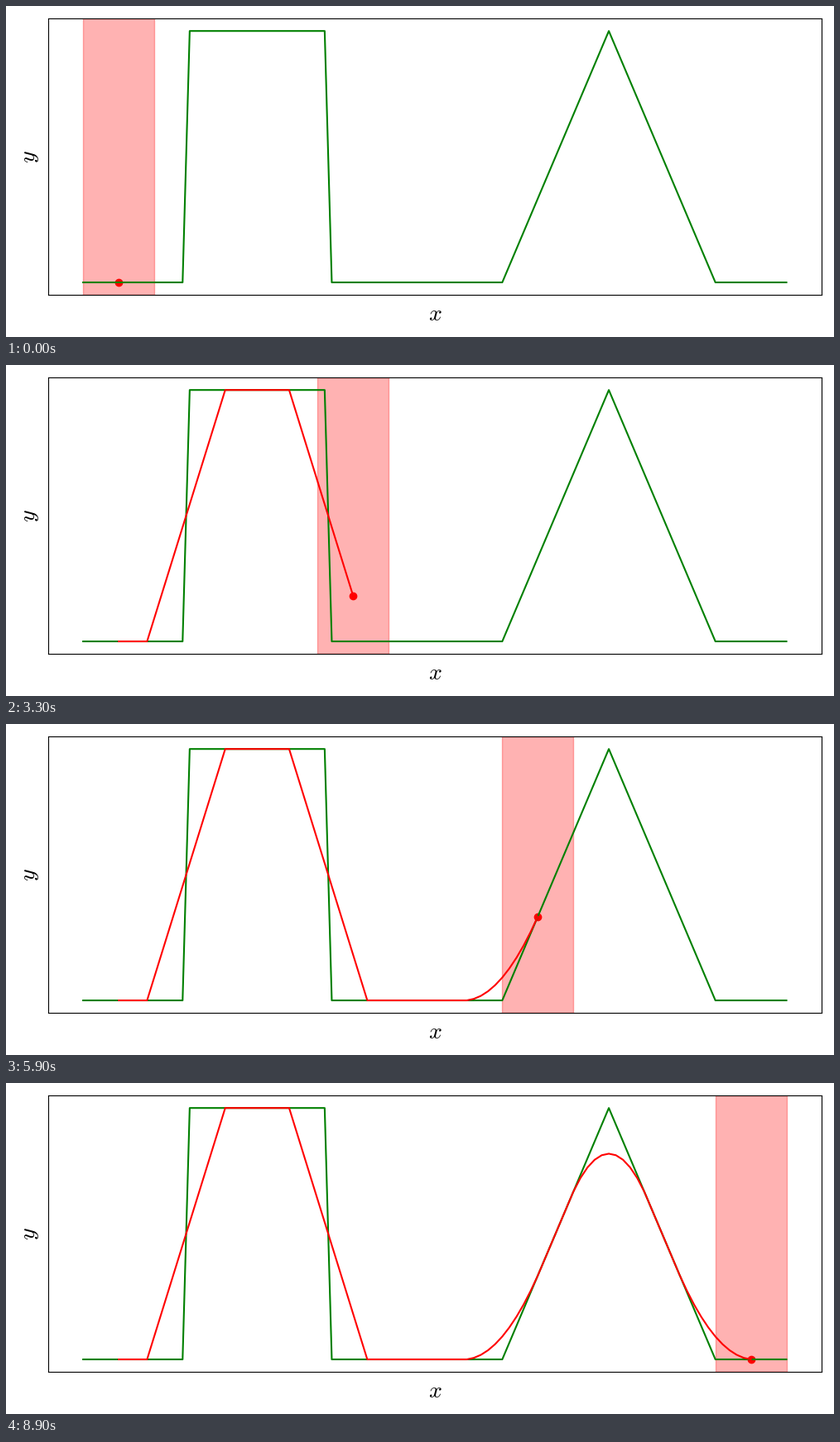
These frames come from a looping animation (1000x400 px, 9 s). A matplotlib script:

```python
import numpy as np
import matplotlib.pyplot as plt
from matplotlib.animation import FuncAnimation

plt.rcParams["mathtext.fontset"] = "cm"

W, H, DPI = 1000, 400, 100
COUNT = 100
SPAN = 10  # window width in samples
FRAMES = COUNT - SPAN
LEFT, RIGHT, TOP, BOTTOM = 50.7, 985, 15, 349.2

# A box pulse followed by a triangle pulse
x = np.arange(COUNT)
box = ((x >= 15) & (x < 35)).astype(float)
signal = box + np.clip(1 - np.abs(x - 74) / 15, 0, None)

kernel = np.ones(SPAN + 1) / (SPAN + 1)
smooth = np.convolve(signal, kernel, mode="valid")
centers = np.arange(FRAMES) + SPAN / 2

fig = plt.figure(figsize=(W / DPI, H / DPI), dpi=DPI, facecolor="white")
ax = fig.add_axes([LEFT / W, 1 - BOTTOM / H, (RIGHT - LEFT) / W, (BOTTOM - TOP) / H])
ax.set_xticks([])
ax.set_yticks([])
margin = 0.05
ax.set_xlim(-margin * (COUNT - 1), (1 + margin) * (COUNT - 1))
ax.set_ylim(-margin, 1 + margin)

window = ax.axvspan(0, SPAN, color="red", alpha=0.3)
dot = ax.scatter([centers[0]], [smooth[0]], color="red")
ax.plot(x, signal, color="green")
trail, = ax.plot([], [], color="red")


def label(px, py, text, angle=0):
    fig.text(px / W, 1 - py / H, text, fontsize=20, rotation=angle,
             rotation_mode="anchor", ha="center", va="baseline")


label(518, 380, "$x$")
label(34.5, 182, "$y$", 90)


def update(n):
    window.set_x(n)
    dot.set_offsets([[centers[n], smooth[n]]])
    trail.set_data(centers[:n + 1], smooth[:n + 1])
    return window, dot, trail


anim = FuncAnimation(fig, update, frames=FRAMES, interval=100,
                     repeat=True, repeat_delay=0, blit=False)
plt.show()
```
